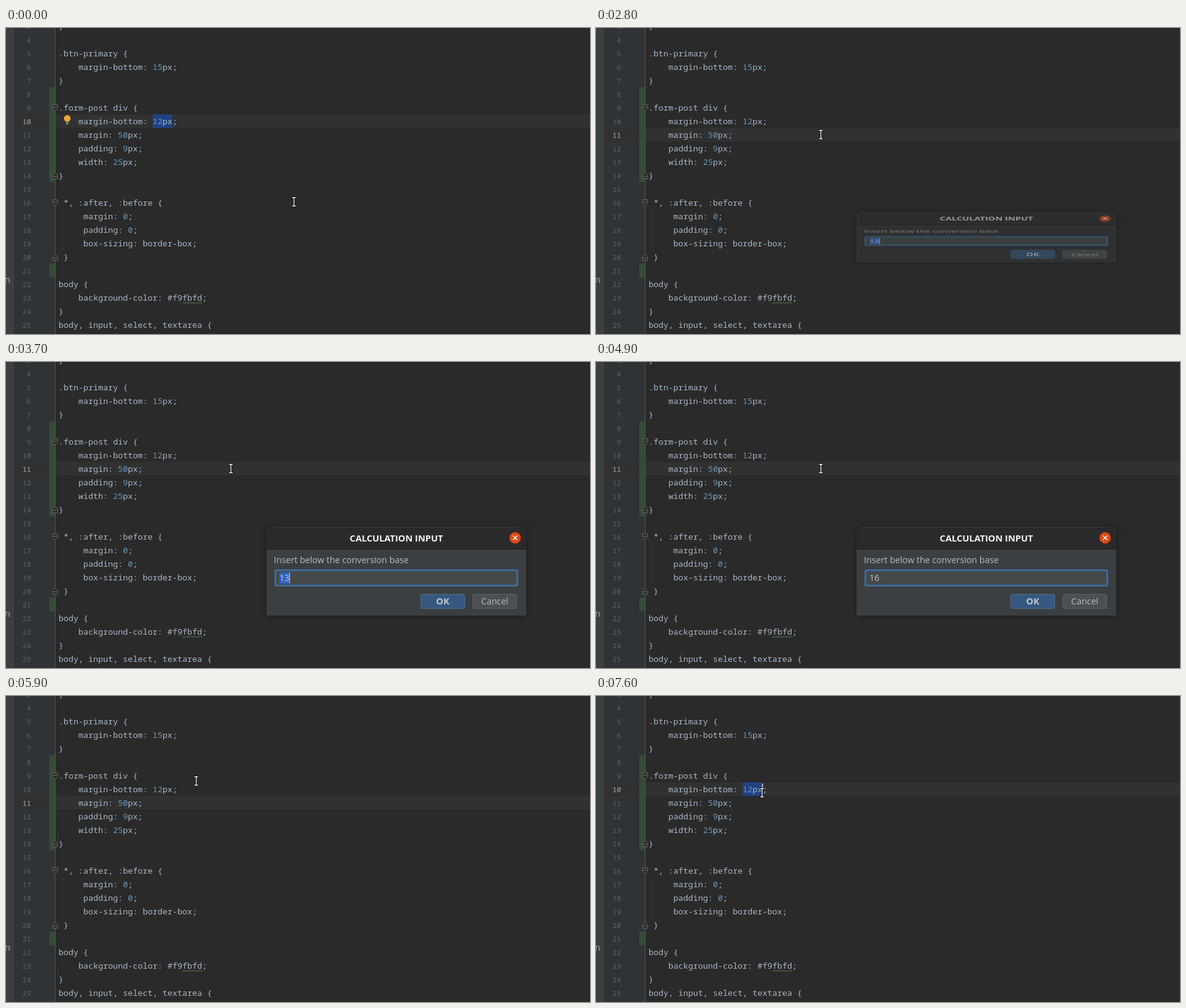
Animation of 944 by 496 pixels, one loop 8000 ms. Source, as an HTML page with a canvas:

```html
<!DOCTYPE html>
<html lang="en">
<head>
<meta charset="utf-8">
<title>Stylesheet editor</title>
<style>
html, body { margin: 0; width: 100%; height: 100%; overflow: hidden; background: #2a2a2a; }
canvas { display: block; }
</style>
</head>
<body>
<canvas id="stage" width="944" height="496"></canvas>
<script>
const ctx = document.getElementById('stage').getContext('2d');
const LOOP = 8000, STEP = 100, FIRST_LINE = 3, ROW = 22, COL = 8, LEFT = 85;
const CODE_FONT = '13.333px "Noto Sans Mono", monospace';
const NUMBER_FONT = '11.667px "Noto Sans Mono", monospace';
const UI_FONT = '14.2px "Open Sans", sans-serif';
const UI_BOLD = 'bold 14.6px "Open Sans", sans-serif';

const code = `}

.btn-primary {
    margin-bottom: 15px;
}

.form-post div {
    margin-bottom: 12px;
    margin: 50px;
    padding: 9px;
    width: 25px;
}

 *, :after, :before {
     margin: 0;
     padding: 0;
     box-sizing: border-box;
 }

body {
    background-color: #f9fbfd;
}
body, input, select, textarea {`.split('\n');

// Mouse positions: time, x, y
const mousePath = [
  [0, 466, 282], [500, 466, 282], [600, 445, 262], [700, 408, 226], [800, 374, 193],
  [900, 359, 179], [1200, 359, 179], [1300, 364, 173], [5800, 364, 173], [5900, 308, 138],
  [6000, 308, 138], [6100, 303, 127], [6200, 292, 125], [6300, 276, 139], [6400, 268, 151],
  [6600, 268, 151], [7000, 238, 156], [7500, 263, 156], [7600, 269, 157], [8000, 269, 157]
];

const rowTop = line => line * ROW - 80;
const within = (t, ...spans) => spans.some(([from, to]) => t >= from && t < to);

function rect(x, y, w, h, color) {
  ctx.fillStyle = color;
  ctx.fillRect(x, y, w, h);
}

function text(str, x, y, font, color, align = 'left') {
  ctx.font = font;
  ctx.fillStyle = color;
  ctx.textAlign = align;
  ctx.fillText(str, x, y);
}

function line(points, color, width = 1) {
  ctx.beginPath();
  points.forEach(([x, y]) => ctx.lineTo(x, y));
  ctx.strokeStyle = color;
  ctx.lineWidth = width;
  ctx.stroke();
}

function box(x, y, w, h, radius, fill, stroke, width = 1) {
  ctx.beginPath();
  ctx.roundRect(x, y, w, h, radius);
  ctx.fillStyle = fill;
  ctx.fill();
  if (!stroke) return;
  ctx.strokeStyle = stroke;
  ctx.lineWidth = width;
  ctx.stroke();
}

function circle(x, y, r, color) {
  ctx.beginPath();
  ctx.arc(x, y, r, 0, Math.PI * 2);
  ctx.fillStyle = color;
  ctx.fill();
}

function mouseAt(t) {
  const i = mousePath.findIndex(p => p[0] > t);
  const [t0, x0, y0] = mousePath[i - 1], [t1, x1, y1] = mousePath[i];
  const k = (t - t0) / (t1 - t0);
  return [Math.round(x0 + (x1 - x0) * k), Math.round(y0 + (y1 - y0) * k)];
}

function drawFold(lineNumber, dir) {
  const y = rowTop(lineNumber) + 11.5;
  ctx.beginPath();
  [[-4, -5], [4, -5], [4, 1], [0, 5], [-4, 1]].forEach(([dx, dy]) => ctx.lineTo(79.5 + dx, y + dy * dir));
  ctx.closePath();
  ctx.fillStyle = '#2a2a2a';
  ctx.fill();
  ctx.strokeStyle = '#686868';
  ctx.lineWidth = 1;
  ctx.stroke();
  line([[77, y - dir], [82, y - dir]], '#7c7c7c');
}

function drawBulb(lineNumber) {
  const y = rowTop(lineNumber);
  circle(99, y + 6.5, 5.3, '#f0a732');
  rect(96.5, y + 10, 5, 2, '#f0a732');
  rect(96.5, y + 13, 5, 1, '#aeb1b4');
  rect(97, y + 15, 4, 1, '#aeb1b4');
}

function drawEditor(current, selectionEnd) {
  rect(0, 0, 944, 496, '#2a2a2a');
  rect(0, 0, 13, 496, '#3c3f41');
  rect(13, 0, 66, 496, '#2f3335');
  rect(13, rowTop(current), 931, ROW, '#313131');
  rect(70, rowTop(8), 9, 7 * ROW, '#364b36');
  rect(70, rowTop(21), 9, ROW, '#364b36');
  rect(79, 0, 1, 496, '#555555');
  rect(91, rowTop(17), 1, 3 * ROW, '#393939');
  text('n', 7, 413, UI_FONT, '#b0b0b0', 'right');
  if (selectionEnd > 237) rect(237, rowTop(10), selectionEnd - 237, ROW, '#214283');

  code.forEach((row, i) => {
    const n = i + FIRST_LINE, y = rowTop(n) + 16;
    text(n, 40.5, y, NUMBER_FONT, n === current ? '#a9a9a9' : '#606366', 'right');
    let x = LEFT;
    for (const part of row.split(/(\d+(?=px|;))/)) {
      text(part, x, y, CODE_FONT, /^\d+$/.test(part) ? '#6897bb' : '#a9b7c6');
      x += part.length * COL;
    }
  });

  const wave = Array.from({ length: 17 }, (_, i) => [285 + i * 2, i % 2 ? 444.5 : 446.5]);
  line(wave, '#5b8a60');
  drawFold(9, 1);
  drawFold(14, -1);
  drawFold(16, 1);
  drawFold(20, -1);
}

function drawDialog(t) {
  const [scale, alpha] = t < 2800 ? [.2, .2] : t < 2900 ? [.5625, .55] : t < 5100 ? [1, 1] : [.444, .75];
  const value = t < 4200 ? '13' : t < 4400 ? '1' : '16';
  ctx.save();
  ctx.globalAlpha = alpha;
  ctx.translate(0, 339.5);
  ctx.scale(1, scale);
  ctx.translate(0, -339.5);

  ctx.shadowColor = 'rgba(0,0,0,.4)';
  ctx.shadowBlur = 8;
  box(421, 267, 420, 144, [8, 8, 2, 2], '#3c3f41');
  ctx.shadowColor = 'transparent';
  box(421, 267, 420, 37, [8, 8, 0, 0], '#2a2a2a');
  line([[429, 267.5], [833, 267.5]], '#3a3a3a');
  line([[421, 303.5], [841, 303.5]], '#202020');
  text('CALCULATION INPUT', 631, 291, UI_BOLD, '#f4f4f4', 'center');
  circle(823, 285, 9.2, '#dd4814');
  line([[819.5, 281.5], [826.5, 288.5]], '#fff', 1.5);
  line([[826.5, 281.5], [819.5, 288.5]], '#fff', 1.5);

  text('Insert below the conversion base', 433, 326, UI_FONT, '#bbbbbb');
  box(435.5, 337.5, 391, 25, 2, '#45494a', '#3d6a9b', 3);
  if (t < 4200) rect(442, 341, 16, 18, '#2f65ca');
  text(value, 442, 355, UI_FONT, '#c4c4c4');
  if (within(t, [2800, 3300], [3700, 4900])) {
    rect(value.length === 1 ? 450 : 458, 341, 1, 18, '#d0d0d0');
  }

  box(670.5, 376.5, 71, 23, 3, '#365880', '#4c708c');
  box(754.5, 376.5, 71, 23, 3, '#4c5052', '#5e6060');
  text('OK', 706, 393, UI_BOLD, '#c2c8ce', 'center');
  text('Cancel', 790, 393, UI_FONT, '#bbbbbb', 'center');
  ctx.restore();
}

function drawMouse(x, y) {
  ctx.lineCap = 'square';
  for (const [color, width] of [['#000', 3.2], ['#fff', 1.4]]) {
    line([[x - .5, y - 7], [x - .5, y + 6.5]], color, width);
    line([[x - 3, y - 7], [x + 2, y - 7]], color, width);
    line([[x - 3, y + 6.5], [x + 2, y + 6.5]], color, width);
  }
  ctx.lineCap = 'butt';
}

function draw(t) {
  const [mouseX, mouseY] = mouseAt(t);
  const current = within(t, [1000, 7000]) ? 11 : 10;
  const dragEnd = t < 7000 ? 269 : Math.min(269, 237 + COL * Math.ceil((mouseX - 238) / COL));
  drawEditor(current, current === 10 ? dragEnd : 0);

  if (t < 1000) drawBulb(10);
  if (within(t, [2200, 2700], [6200, 7000])) drawBulb(11);
  if (within(t, [1000, 1500], [2200, 2500], [5100, 5600], [6100, 6700])) rect(220, 164, 2, 18, '#bbbbbb');
  if (t >= 7000) rect(dragEnd - 1, 142, 2, 18, '#bbbbbb');
  if (within(t, [2700, 5200])) drawDialog(t);
  drawMouse(mouseX, mouseY);
}

function frame() {
  const t = performance.now() % LOOP;
  draw(Math.floor(t / STEP) * STEP);
  requestAnimationFrame(frame);
}
frame();
</script>
</body>
</html>
```
